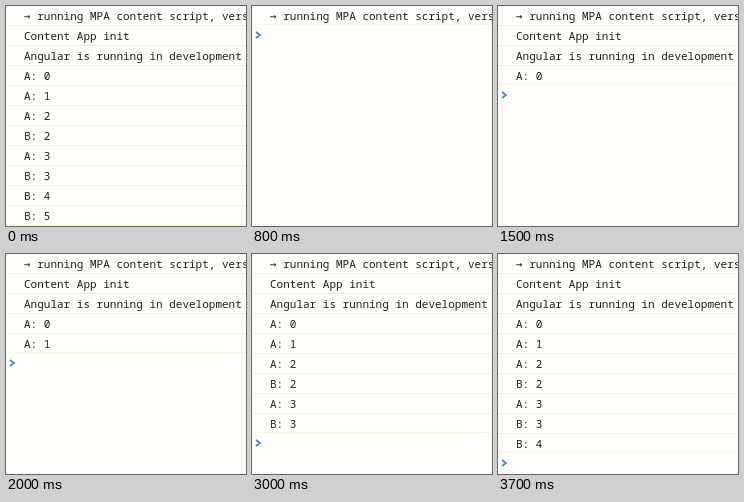
These frames come from a looping animation (240x220 px, 4 s). An HTML page:

```html
<!DOCTYPE html>
<html lang="en">
<head>
<meta charset="utf-8">
<title>Console log</title>
<style>
  html, body { margin: 0; width: 100%; height: 100%; overflow: hidden; background: #fffffb; }
  #console { position: absolute; width: 240px; height: 220px; overflow: hidden; }
  .row {
    box-sizing: border-box; height: 20px; padding-left: 18px;
    border-bottom: 1px solid #f0f0e6;
    font: 11px/20px "Noto Sans Mono", "Liberation Mono", monospace;
    color: #202016; white-space: pre;
  }
  .row[hidden] { display: none; }
  .arrow { font-family: "DejaVu Sans Mono", monospace; line-height: 1; }
  /* The prompt's own rule replaces the border of the row above it */
  #prompt {
    position: relative; margin-top: -2px; height: 22px;
    border-top: 1px solid #f7f7da; background: #fffffb;
  }
  svg { display: block; }
</style>
</head>
<body>
<div id="console"></div>
<script>
const LOOP = 4000, CLEAR = 500;
// Each entry: time of logging in ms, markup
const log = [
  [800, `<span class="arrow">→</span> running MPA content script, version`],
  [900, "Content App init"],
  [1000, "Angular is running in development mode."],
  [1500, "A: 0"],
  [2000, "A: 1"],
  [2500, "A: 2"],
  [2500, "B: 2"],
  [3000, "A: 3"],
  [3000, "B: 3"],
  [3500, "B: 4"],
  [4000, "B: 5"],
];

const view = document.getElementById("console");
view.innerHTML = log.map(([, html]) => `<div class="row">${html}</div>`).join("") +
  `<div id="prompt"><svg width="20" height="20"><path d="M4 7l4 3-4 3"
    fill="none" stroke="#4a80c4" stroke-width="1.6"/></svg></div>`;
const rows = view.querySelectorAll(".row");

const start = performance.now();
function draw(now) {
  const t = Math.max(0, now - start) % LOOP;
  // The full log stays on screen until it is cleared
  const time = t < CLEAR ? t + LOOP : t;
  rows.forEach((row, i) => { row.hidden = time < log[i][0]; });
  requestAnimationFrame(draw);
}
draw(start);
</script>
</body>
</html>
```
